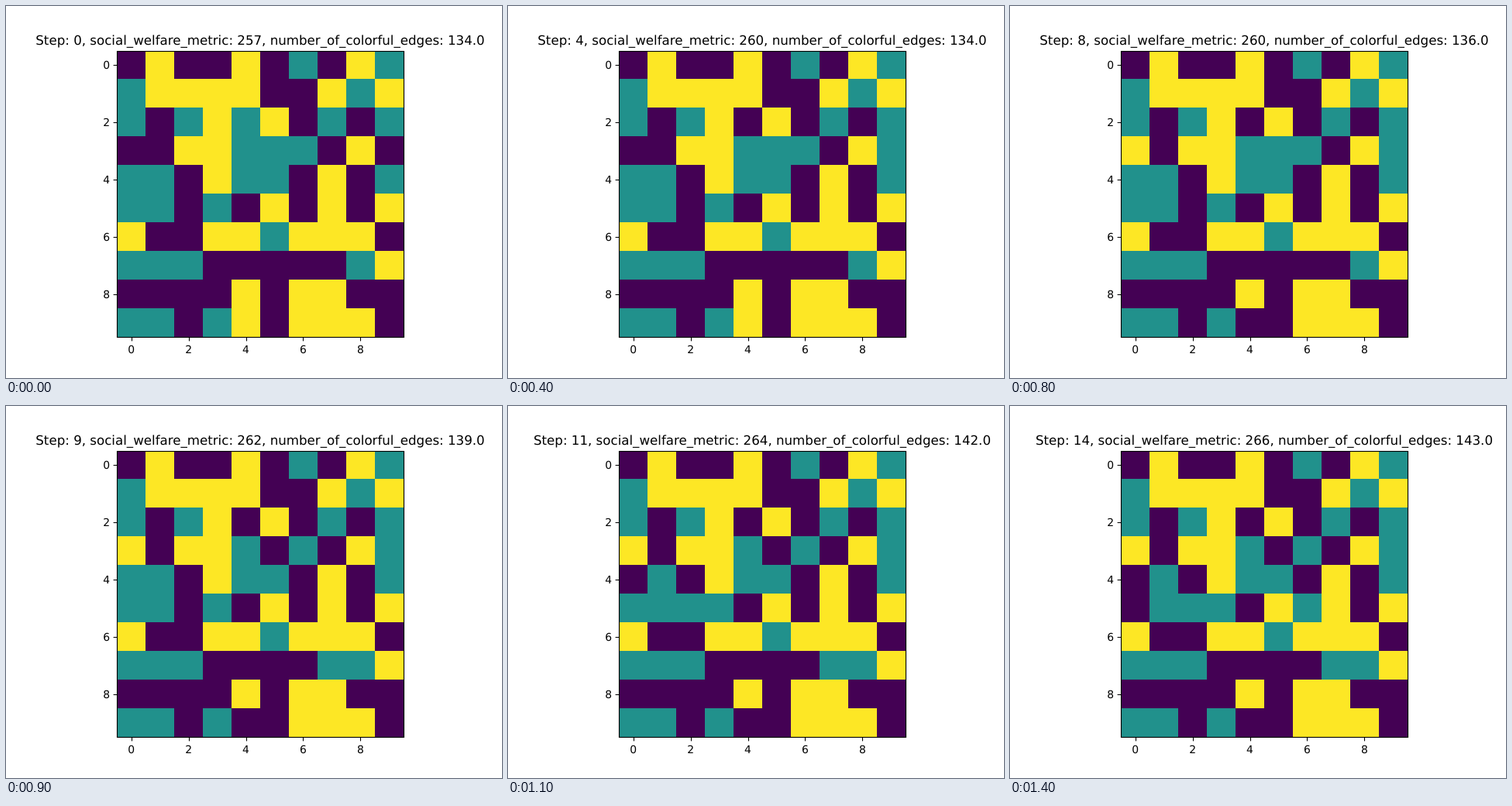
These frames come from a looping animation (640x480 px, 1.5 s). An HTML page with a canvas:

```html
<!DOCTYPE html>
<html>
<head>
<meta charset="utf-8">
<style>
  html, body { margin: 0; width: 100%; height: 100%; overflow: hidden; background: #fff; }
  canvas { display: block; }
</style>
</head>
<body>
<canvas id="stage" width="640" height="480"></canvas>
<script>
const ctx = document.getElementById('stage').getContext('2d');
const COLORS = ['#440154', '#21918c', '#fde725'];
const LEFT = 143, TOP = 57, CELL = 37;
const STEP_MS = 100, STEPS = 15;

const START = [
  '0200201021', '1222200212', '1012120101', '0022111020', '1102110201',
  '1101020202', '2002212220', '1110000012', '0000202200', '1101202220'
];

// Each swap exchanges two cells, given as [row, column].
const SWAPS = [
  { step: 2, a: [2, 4], b: [3, 9], welfare: 260, edges: 134 },
  { step: 8, a: [3, 0], b: [9, 4], welfare: 260, edges: 136 },
  { step: 9, a: [3, 5], b: [7, 7], welfare: 262, edges: 139 },
  { step: 11, a: [4, 0], b: [5, 2], welfare: 264, edges: 142 },
  { step: 14, a: [5, 0], b: [5, 6], welfare: 266, edges: 143 }
];

function stateAt(step) {
  const grid = START.map(row => [...row]);
  let welfare = 257, edges = 134;
  for (const swap of SWAPS.filter(s => s.step <= step)) {
    const [r1, c1] = swap.a, [r2, c2] = swap.b;
    [grid[r1][c1], grid[r2][c2]] = [grid[r2][c2], grid[r1][c1]];
    ({ welfare, edges } = swap);
  }
  return { grid, welfare, edges };
}

function label(text, x, y, size, align) {
  ctx.font = `${size}px "DejaVu Sans", sans-serif`;
  ctx.textRendering = 'geometricPrecision';
  ctx.textAlign = align;
  ctx.fillText(text, x, y);
}

function line(x1, y1, x2, y2) {
  ctx.beginPath();
  ctx.moveTo(x1, y1);
  ctx.lineTo(x2, y2);
  ctx.stroke();
}

function drawAxes() {
  ctx.fillStyle = ctx.strokeStyle = '#000';
  ctx.lineWidth = 1.11;
  ctx.strokeRect(143.5, 58.5, 370, 369);
  for (let i = 0; i < 10; i += 2) {
    const x = 161.68 + 36.96 * i, y = 76.08 + 36.96 * i;
    const tickX = Math.round(x) + 0.5, tickY = Math.round(y) + 0.5;
    line(tickX, 427.5, tickX, 432.4);
    line(143.5, tickY, 138.6, tickY);
    label(i, x, 448, 13.89, 'center');
    label(i, 134, Math.round(y) + 5, 13.89, 'right');
  }
}

function draw(step) {
  const { grid, welfare, edges } = stateAt(step);
  ctx.fillStyle = '#fff';
  ctx.fillRect(0, 0, 640, 480);
  grid.forEach((row, r) => row.forEach((value, c) => {
    ctx.fillStyle = COLORS[value];
    ctx.fillRect(LEFT + c * CELL, TOP + r * CELL, CELL, CELL);
  }));
  ctx.fillStyle = '#fff';
  ctx.fillRect(LEFT, TOP, 10 * CELL, 1);
  drawAxes();
  label(`Step: ${step}, social_welfare_metric: ${welfare}, number_of_colorful_edges: ${edges}.0`,
    328, 50, 16.67, 'center');
}

const startTime = performance.now();
function tick() {
  const elapsed = performance.now() - startTime;
  draw(Math.floor(elapsed / STEP_MS) % STEPS);
  requestAnimationFrame(tick);
}
tick();
</script>
</body>
</html>
```
